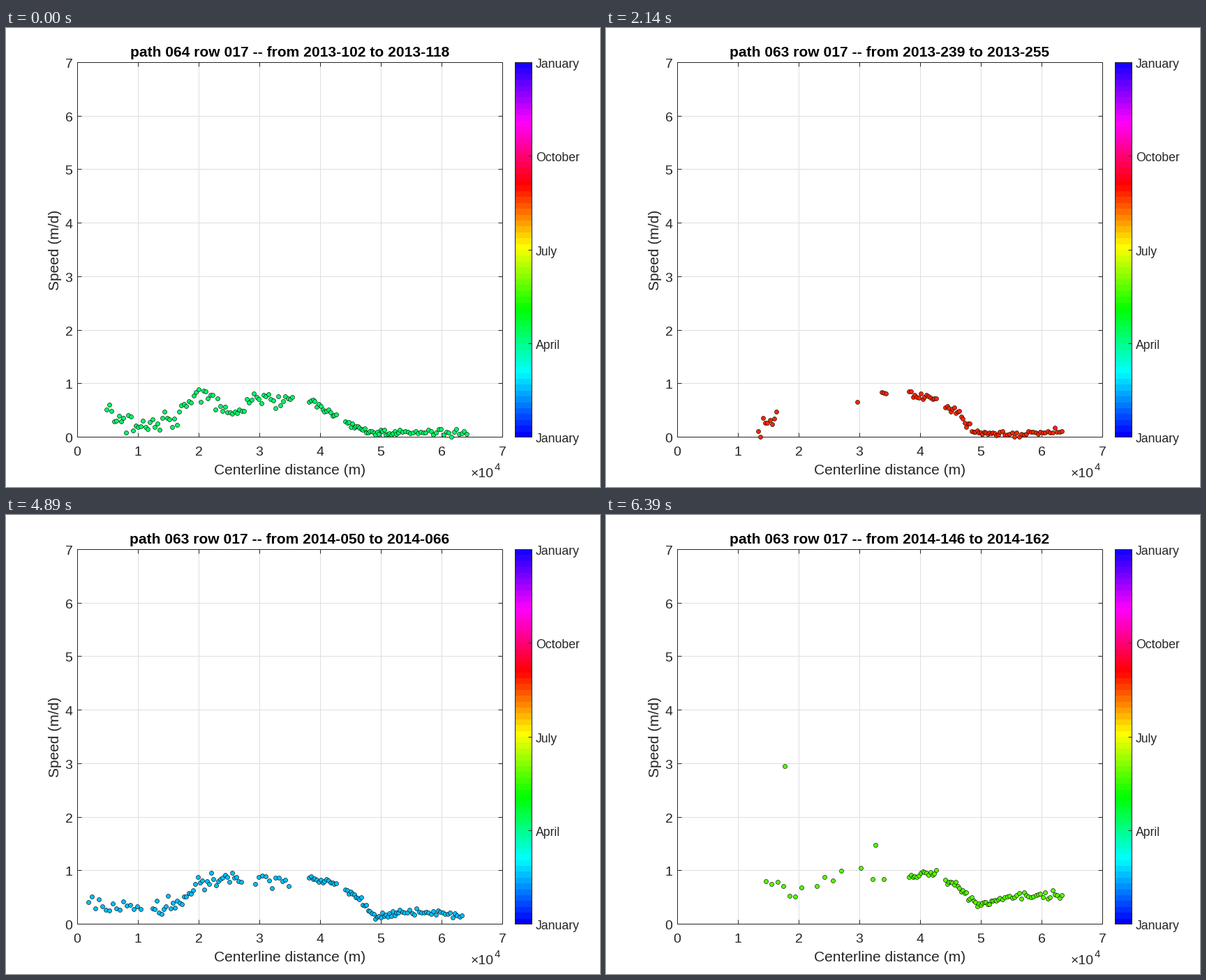
Recreate the animation shown at these times as a matplotlib script. Size 851 px wide and 658 px high, loop 8 s.

```python
import colorsys

import matplotlib.pyplot as plt
import numpy as np
from matplotlib.animation import FuncAnimation

W, H, DPI = 851, 658, 100
PX = 72 / DPI                      # points per stage pixel
LEFT, RIGHT, TOP, BASE = 102, 711, 49, 586
BAR_L, BAR_R = 729, 753
INK, GRID = "#262626", "#dedede"
STEP, LOOP = 20, 8000              # ms
FIRST_DAY, MS_PER_DAY = 102, 15.625
LEVELS = 64

plt.rcParams["font.family"] = "Liberation Sans"
palette = [colorsys.hsv_to_rgb((2 / 3 - k / LEVELS) % 1, 1, 1) for k in range(LEVELS)]

# Speed (m/d) at a few places along the glacier (km), by day since 2013 began;
# days between are interpolated.
KM = [0, 8, 13, 17, 20, 25, 30, 38, 42, 46, 49, 55, 64]
SPEED = {
    102: [.8, .24, .22, .42, .9, .5, .72, .72, .42, .2, .07, .1, .08],
    198: [.35, .3, .27, .32, .83, 1.05, .8, .74, .57, .15, .06, .1, .14],
    239: [.1, .1, .1, .5, .7, .75, .75, .78, .72, .48, .08, .06, .1],
    367: [.3, .3, .3, .4, .6, .65, .82, .74, .58, .48, .12, .18, .28],
    415: [.42, .35, .25, .4, .75, .85, .78, .84, .82, .5, .12, .22, .16],
    454: [.3, .3, .15, .35, .72, .9, .95, .83, .78, .52, .12, .15, .18],
    511: [.9, .9, .9, .75, .5, .85, .92, .9, .95, .72, .37, .52, .55],
}

# Stretches of the upper glacier with data: from km, to km, number of dots.
COVER = {
    102: [(4.8, 35.4, 78)],
    150: [(4.8, 35.2, 60)],
    198: [(1, 8.2, 7), (10.6, 19.6, 27), (23.5, 34.4, 7)],
    223: [(13.7, 16.3, 6), (29, 34.5, 5)],
    239: [(13.3, 16.3, 9), (29.6, 29.6, 1), (33.6, 34.3, 3)],
    367: [(28.3, 29.3, 2), (35.6, 35.6, 1)],
    390: [(0.7, 35, 45)],
    406: [(0.7, 35, 50)],
    415: [(1.8, 10.4, 16), (12.3, 26.9, 40), (29.3, 34.8, 11)],
    431: [(5.2, 34.8, 50)],
    454: [(13.1, 15, 4), (18.7, 24.6, 14), (29.7, 30.6, 2), (33.3, 34.7, 5)],
    486: [(13.9, 35, 25)],
    511: [(14.5, 20.4, 7), (22.9, 26.9, 4), (30.2, 34, 3)],
}
LOWER = [(38.1, 42.6, 15), (44.1, 52.8, 31)]
OUTLIERS = {511: [(17.7, 2.95), (32.6, 1.48)]}


def to_x(km):
    return LEFT + 0.5 + (RIGHT - LEFT) * km / 70


def to_y(speed):
    return BASE + 0.5 - (BASE - TOP) * speed / 7


def date(day):
    return f"{2013 + (day - 1) // 365}-{(day - 1) % 365 + 1:03d}"


def profile(day):
    days = list(SPEED)
    return [np.interp(day, days, speeds) for speeds in zip(*SPEED.values())]


def measure(day, end):
    """Dot positions on the stage for one image pair."""
    rng = np.random.default_rng(day)
    spans = COVER[day] + LOWER + [(53.1, end, 27)]
    km = np.concatenate([np.linspace(*span) for span in spans])
    noise = np.where(km < 36, 0.08, 0.03) * rng.normal(size=km.size)
    speed = np.clip(np.interp(km, KM, profile(day)) + noise, 0.01, None)
    dots = np.column_stack([km, speed])
    if day in OUTLIERS:
        dots = np.vstack([dots, OUTLIERS[day]])
    return to_x(dots[:, 0]), to_y(dots[:, 1])


def scene(day):
    path, end = (64, 64.1) if day % 16 == FIRST_DAY % 16 else (63, 63.3)
    return dict(
        start=(day - FIRST_DAY) * MS_PER_DAY // 10 * 10,
        title=f"path {path:03d} row 017 -- from {date(day)} to {date(day + 16)}",
        color=palette[int(day % 365 / 365 * LEVELS)],
        dots=measure(day, end))


scenes = [scene(day) for day in COVER]

fig = plt.figure(figsize=(W / DPI, H / DPI), dpi=DPI, facecolor="white")
ax = fig.add_axes([0, 0, 1, 1])
ax.axis("off")


def line(xs, ys, color=INK, z=2):
    ax.plot(xs, ys, color=color, lw=PX, zorder=z, solid_capstyle="butt")


def frame(x0, x1):
    line([x0, x1, x1, x0, x0], [TOP, TOP, BASE, BASE, TOP], z=3)


def text(x, y, s, size, ha="center", **kw):
    kw.setdefault("color", INK)
    return ax.text(x, y, s, fontsize=size * PX, ha=ha, va="baseline", **kw)


bar = np.array(palette[::-1])[:, None]
ax.imshow(bar, extent=(BAR_L, BAR_R, BASE + 1, TOP), aspect="auto", interpolation="nearest")

for k in range(8):
    x = LEFT + (RIGHT - LEFT) * k / 7
    y = BASE - (BASE - TOP) * k / 7
    if 0 < k < 7:
        line([x, x], [TOP, BASE], GRID, 1)
        line([LEFT, RIGHT], [y, y], GRID, 1)
        for end, tip in ((TOP, TOP + 6), (BASE, BASE - 6)):
            line([x, x], [end, tip])
        for end, tip in ((LEFT, LEFT + 6), (RIGHT, RIGHT - 6)):
            line([end, tip], [y, y])
    text(x, 613, str(k), 19.5)
    text(95.5, y + 8, str(k), 19.5, "right")

for k, month in enumerate(("January", "April", "July", "October", "January")):
    y = BASE - (BASE - TOP) * k / 4
    line([BAR_R - 5, BAR_R], [y, y], z=3)
    text(759, y + 8, month, 17.6, "left")

frame(LEFT, RIGHT)
frame(BAR_L, BAR_R)
text(407, 640, "Centerline distance (m)", 21)
text(76, 318, "Speed (m/d)", 21, rotation=90, rotation_mode="anchor")
text(666, 644, "×10", 19.5, "left")
text(700, 634, "4", 15, "left")

title = text(406.5, 41, "", 21, weight="bold", color="black")
dots, = ax.plot([], [], "o", ms=6 * PX, mec="black", mew=0.6 * PX, zorder=5)
ax.set_xlim(0, W)
ax.set_ylim(H, 0)


def draw(i):
    t = i * STEP + STEP / 2
    now = [s for s in scenes if s["start"] <= t][-1]
    title.set_text(now["title"])
    dots.set_data(*now["dots"])
    dots.set_markerfacecolor(now["color"])
    return title, dots


anim = FuncAnimation(fig, draw, frames=LOOP // STEP, interval=STEP,
                     init_func=lambda: draw(0), repeat=True, repeat_delay=0)
plt.show()
```
